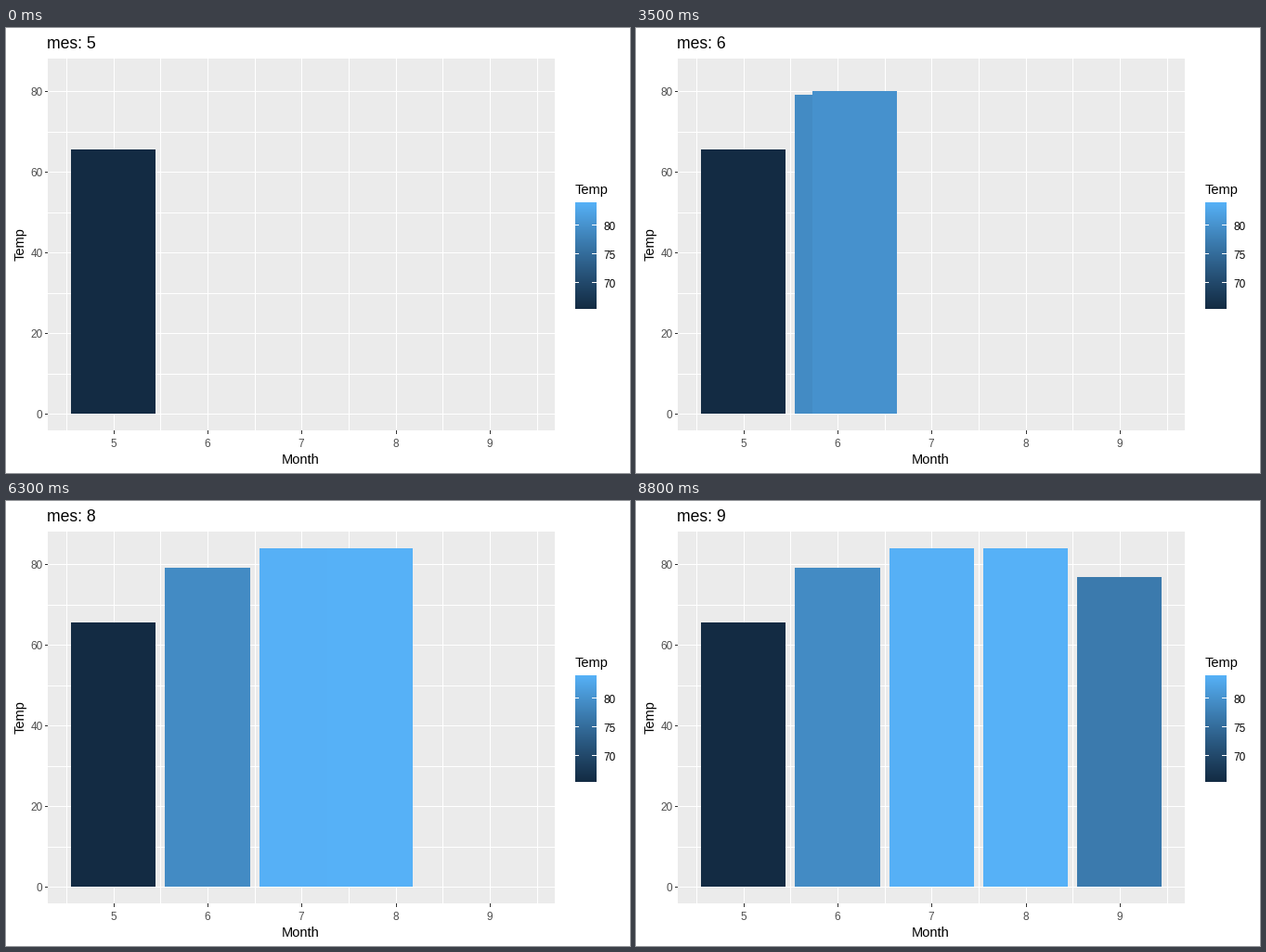
A matplotlib script that plays this animation: 672 by 480 pixels, repeating every 10 s.

```python
import numpy as np
import matplotlib.pyplot as plt
from matplotlib.animation import FuncAnimation
from matplotlib.patches import Rectangle

W, H, DPI = 672, 480, 96
FRAMES, INTERVAL = 100, 100
HOLD, STEPS, PERIOD = 12, 11, 22

MONTHS = np.arange(5, 10)
TEMPS = np.array([65.548, 79.1, 83.903, 83.968, 76.9])
LOW, HIGH = TEMPS.min(), TEMPS.max()

# Panel edges in whole pixels, and the finer scale of the data
LEFT, RIGHT, TOP, BOTTOM = 45, 591, 33, 434
X_FIRST, X_STEP = 115.7, 101.3
Y_ZERO, Y_STEP = 416.04, 4.347

RGB_TO_XYZ = np.array([[0.4124564, 0.3575761, 0.1804375],
                       [0.2126729, 0.7151522, 0.0721750],
                       [0.0193339, 0.1191920, 0.9503041]])
WHITE = RGB_TO_XYZ.sum(axis=1)


def to_lab(rgb):
    c = np.array(rgb) / 255
    lin = np.where(c > 0.04045, ((c + 0.055) / 1.055) ** 2.4, c / 12.92)
    v = RGB_TO_XYZ @ lin / WHITE
    f = np.where(v > 0.008856, np.cbrt(v), 7.787 * v + 16 / 116)
    return np.array([116 * f[1] - 16, 500 * (f[0] - f[1]), 200 * (f[1] - f[2])])


def to_rgb(lab):
    fy = (lab[0] + 16) / 116
    f = np.array([fy + lab[1] / 500, fy, fy - lab[2] / 200])
    v = np.where(f > 0.2069, f ** 3, (f - 16 / 116) / 7.787)
    lin = np.clip(np.linalg.solve(RGB_TO_XYZ, v * WHITE), 0, 1)
    c = np.where(lin > 0.0031308, 1.055 * lin ** (1 / 2.4) - 0.055, 12.92 * lin)
    return np.clip(c, 0, 1)


DARK, LIGHT = to_lab((0x13, 0x2B, 0x43)), to_lab((0x56, 0xB1, 0xF7))


def shade(temp):
    """Colour of a temperature, blended in Lab space."""
    t = (temp - LOW) / (HIGH - LOW)
    return to_rgb(DARK + t * (LIGHT - DARK))


def px(month):
    return round(X_FIRST + (month - MONTHS[0]) * X_STEP)


def py(temp):
    return round(Y_ZERO - temp * Y_STEP)


def bar_box(month, temp):
    x0, x1 = px(month - 0.45), px(month + 0.45)
    y0, y1 = py(temp), py(0)
    return x0, y0, x1 - x0, y1 - y0


fig = plt.figure(figsize=(W / DPI, H / DPI), dpi=DPI, facecolor="white")
ax = fig.add_axes([0, 0, 1, 1])
ax.set_axis_off()


def box(x, y, w, h, color, z=1):
    patch = Rectangle((x, y), w, h, facecolor=color, linewidth=0,
                      antialiased=False, zorder=z)
    return ax.add_patch(patch)


def label(x, y, text, size=8.8, color="black", ha="left", **kw):
    return ax.text(x, y, text, fontsize=size, color=color, ha=ha,
                   va="baseline", family="Liberation Sans", **kw)


# Panel, grid and axes
GREY, TICK = "#4D4D4D", "#333333"
box(LEFT, TOP, RIGHT - LEFT, BOTTOM - TOP, "#EBEBEB")
for m in np.arange(4.5, 9.6, 0.5):
    box(px(m), TOP, 1, BOTTOM - TOP, "white")
for v in range(0, 90, 10):
    box(LEFT, py(v), RIGHT - LEFT, 1, "white")
for m in MONTHS:
    box(px(m), BOTTOM, 1, 4, TICK)
    label(px(m), 452, str(m), color=GREY, ha="center")
for v in range(0, 81, 20):
    box(LEFT - 3, py(v), 3, 1, TICK)
    label(39.5, py(v) + 5, str(v), color=GREY, ha="right")
label(317.5, 470, "Month", 11, ha="center")
label(20, 233.5, "Temp", 11, ha="center", rotation=90, rotation_mode="anchor")

# Colour bar
BAR_X, BAR_Y, BAR_W, BAR_H = 613, 188, 23, 115
label(BAR_X, 179, "Temp", 11)
ramp = np.array([[shade(t)] for t in np.linspace(HIGH, LOW, BAR_H)])
ax.imshow(ramp, extent=(BAR_X, BAR_X + BAR_W, BAR_Y + BAR_H, BAR_Y),
          interpolation="nearest", aspect="auto", zorder=1)
for v in (70, 75, 80):
    y = round(BAR_Y - 1 + (HIGH - v) / (HIGH - LOW) * BAR_H)
    box(BAR_X, y, 4, 1, "white", 2)
    box(BAR_X + BAR_W - 5, y, 5, 1, "white", 2)
    label(643, y + 6, str(v))

ax.set_xlim(0, W)
ax.set_ylim(H, 0)

# Bars that stay behind, and the one that travels
marks = [box(*bar_box(m, t), shade(t), 3) for m, t in zip(MONTHS, TEMPS)]
mover = box(*bar_box(MONTHS[0], TEMPS[0]), shade(TEMPS[0]), 4)
title = label(44.5, 22, "mes: 5", 13.2)


def draw(i):
    k, p = 0, 0.0
    if i >= HOLD:
        k, step = divmod(i - HOLD, PERIOD)
        p = min((step + 1) / STEPS, 1)
    temp = TEMPS[k] + p * (TEMPS[k + 1] - TEMPS[k])
    mover.set_bounds(*bar_box(MONTHS[k] + p, temp))
    mover.set_facecolor(shade(temp))
    for n, mark in enumerate(marks):
        mark.set_visible(n <= k)
    title.set_text(f"mes: {MONTHS[k] + (p >= 0.5)}")
    return [*marks, mover, title]


anim = FuncAnimation(fig, draw, frames=FRAMES, interval=INTERVAL,
                     repeat=True, repeat_delay=0, blit=False)
plt.show()
```
